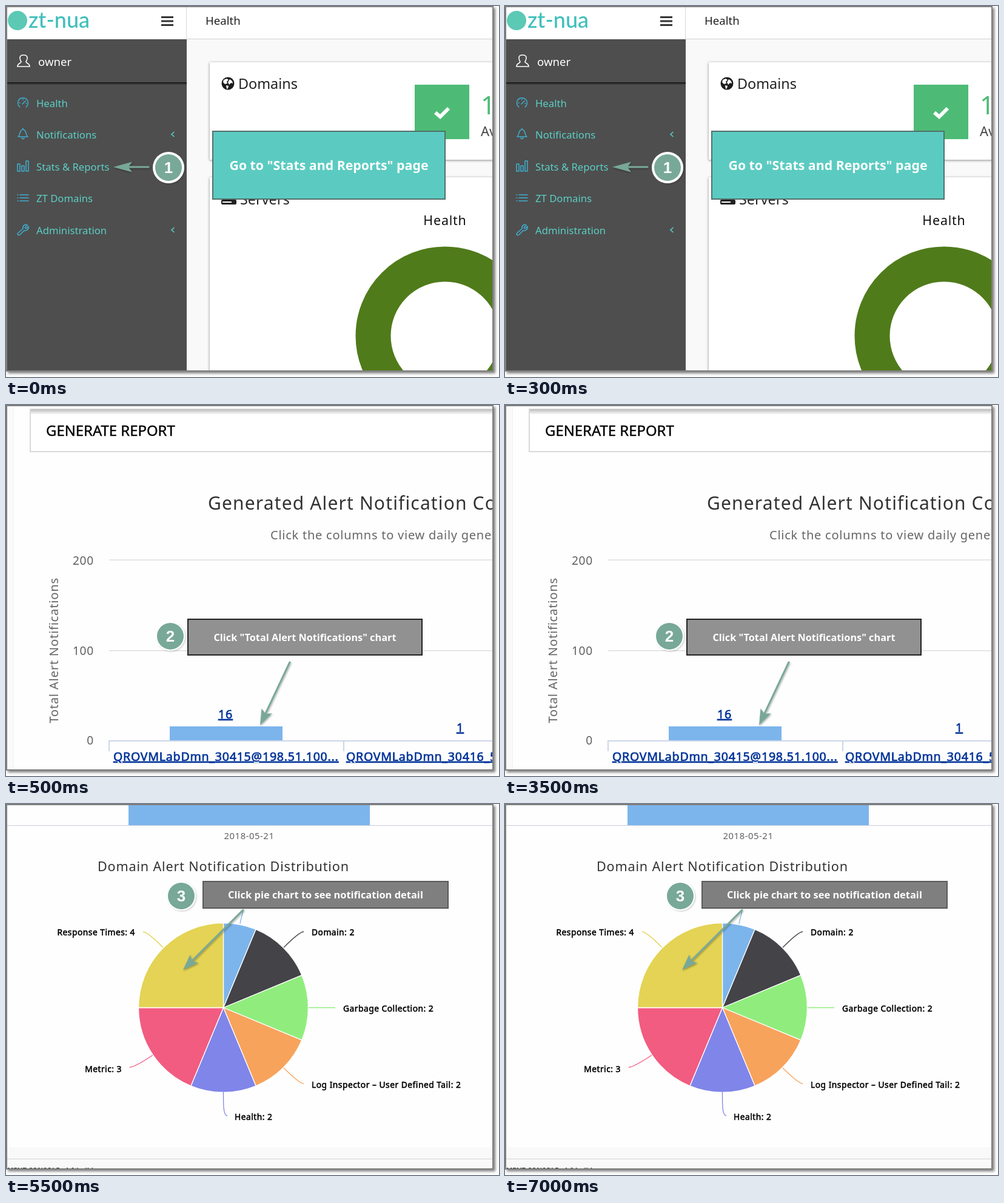
These frames come from a looping animation (813 px wide and 613 px high, 8 s). An HTML page:

```html
<!DOCTYPE html>
<html lang="en">
<head>
<meta charset="utf-8">
<title>Alert notification walkthrough</title>
<style>
  html, body { margin: 0; width: 100%; height: 100%; overflow: hidden; background: #fff; }
  svg { display: block; width: 813px; height: 613px; }
  text { font-family: "Noto Sans", "Open Sans", sans-serif; white-space: pre; }
  .chart { letter-spacing: .038em; }
  .menu { font-size: 16.7px; fill: #5bcfc5; }
  .note { font-weight: 700; fill: #fff; text-anchor: middle; }
  .badge { font: 700 26px "Liberation Sans", Arial, sans-serif; fill: #fff; text-anchor: middle; }
  .icon { fill: none; stroke: #3fb0cf; stroke-width: 1.5; stroke-linecap: round; stroke-linejoin: round; }
  .link { font-size: 19.6px; fill: #003399; stroke: #003399; stroke-width: .7px; text-decoration: underline; }
  .slice { font-size: 13.75px; stroke: #000; stroke-width: .55px; }
  .end { text-anchor: end; }
  .mid { text-anchor: middle; }
</style>
</head>
<body>
<svg viewBox="0 0 813 613">
  <defs>
    <clipPath id="page"><rect x="2" y="2" width="800" height="600"/></clipPath>
    <filter id="soft" x="-20%" y="-20%" width="140%" height="140%">
      <feDropShadow dx="1" dy="1.5" stdDeviation="1.5" flood-opacity=".35"/>
    </filter>
    <filter id="faint" x="-20%" y="-20%" width="140%" height="140%">
      <feDropShadow dx="1.5" dy="1.5" stdDeviation="1" flood-opacity=".18"/>
    </filter>
    <filter id="halo" x="-5%" y="-10%" width="110%" height="120%">
      <feDropShadow dx="0" dy="1" stdDeviation="2" flood-opacity=".45"/>
    </filter>
    <filter id="edge" x="-5%" y="-5%" width="110%" height="110%">
      <feDropShadow dx="3" dy="3" stdDeviation="2" flood-opacity=".5"/>
    </filter>
    <linearGradient id="fade" x2="0" y2="1">
      <stop stop-color="#bbb"/><stop offset="1" stop-color="#fff"/>
    </linearGradient>
  </defs>
  <rect width="804" height="604" fill="#7f7f7f" filter="url(#edge)"/>
  <g id="stage" clip-path="url(#page)"></g>
</svg>
<script>
const LOOP = 8000;
const SAGE = '#78a898';

const rect = (x, y, w, h, fill, extra = '') =>
  `<rect x="${x}" y="${y}" width="${w}" height="${h}" fill="${fill}" ${extra}/>`;

const text = (x, y, str, cls, style = '') =>
  `<text x="${x}" y="${y}" class="${cls}" style="${style}">${str}</text>`;

const icon = (x, y, d) => `<path class="icon" transform="translate(${x} ${y})" d="${d}"/>`;

const badge = (x, y, n, ring) => `
  <circle cx="${x}" cy="${y}" r="${ring}" fill="#fff" filter="url(#faint)"/>
  <circle cx="${x}" cy="${y}" r="22" fill="${SAGE}"/>
  ${text(x, y + 9, n, 'badge')}`;

const note = (x, y, w, h, fill, border, size, str) =>
  rect(x, y, w, h, fill, `stroke="${border}" stroke-width="2"`) +
  text(x + w / 2, y + h / 2 + size * .37, str, 'note', `font-size:${size}px`);

// Swept-back arrow head, drawn along the x axis and rotated into place
function arrow(x1, y1, x2, y2, head, half) {
  const length = Math.hypot(x2 - x1, y2 - y1);
  const angle = Math.atan2(y2 - y1, x2 - x1) * 180 / Math.PI;
  const neck = length - head * .8;
  return `<g filter="url(#soft)"><g transform="translate(${x1} ${y1}) rotate(${angle})">
    <path d="M0 0H${neck}" stroke="${SAGE}" stroke-width="3" stroke-linecap="round"/>
    <path d="M${length} 0L${length - head} ${-half}L${neck} 0L${length - head} ${half}Z" fill="${SAGE}"/>
  </g></g>`;
}

function pie(cx, cy, r, slices) {
  const total = slices.reduce((sum, [n]) => sum + n, 0);
  const point = n => {
    const a = n / total * 2 * Math.PI;
    return `${cx + r * Math.sin(a)} ${cy - r * Math.cos(a)}`;
  };
  let at = 0;
  return slices.map(([n, fill]) => {
    const from = point(at), to = point(at += n);
    return `<path d="M${cx} ${cy}L${from}A${r} ${r} 0 0 1 ${to}Z" fill="${fill}" stroke="#fff" stroke-width="1.3" stroke-linejoin="round"/>`;
  }).join('');
}

function dashboard() {
  const rows = [[160, 'Health'], [212, 'Notifications'], [265, 'Stats &amp; Reports'],
                [317, 'ZT Domains'], [370, 'Administration']];
  const chevron = y => `<path d="M277.5 ${y - 4}l-4.5 4 4.5 4" fill="none" stroke="#5bcfc5" stroke-width="1.6"/>`;
  const card = (y, h) => rect(336, y, 490, h, '#fff', 'filter="url(#halo)"');
  return rect(2, 2, 800, 600, '#f9f9f9') +
    rect(2, 2, 800, 52, '#fff') + rect(298, 54, 504, 1, '#d0d0d0') + rect(297, 2, 1, 52, '#d8d8d8') +
    '<circle cx="19" cy="24" r="16" fill="#5cc9b5"/>' +
    text(37, 36, 'zt-nua', '', 'font:500 36px Lato,sans-serif;fill:#3fbfbc') +
    [17, 23.5, 30].map(y => rect(256, y, 20, 3, '#333')).join('') +
    text(329, 31, 'Health', '', 'font-size:18.6px;fill:#222') +
    rect(2, 55, 296, 547, '#4e4e4e') +
    rect(2, 126, 296, 2, '#1c1c1c') + rect(2, 128, 296, 2, '#3d3d3d') +
    '<path d="M25 92C21 85 23 81 29 81S37 85 33 92C33 95 39 94 39 100H19C19 94 25 95 25 92Z" fill="none" stroke="#fff" stroke-width="1.6"/>' +
    text(53, 99, 'owner', '', 'font-size:18.6px;fill:#fff') +
    icon(28, 160, 'M-5 7A8.5 8.5 0 1 1 5 7M-1 2L4-3M-6 0h1M0-6v1M6 1h-1') +
    icon(28, 211, 'M-8 5C-4 2-6-7 0-7S4 2 8 5ZM-2 7Q0 10 2 7M0-9v2') +
    icon(28, 265, 'M-9 8V-4h4V8ZM-2 8V-1h4V8ZM5 8V-9h4V8Z') +
    icon(28, 317, 'M-9-5h1M-9 0h1M-9 5h1M-5-5H9M-5 0H9M-5 5H9') +
    icon(28, 370, 'M-8 5L0-2C-1-7 3-10 7-8L3-4 5-2 9-6C10-1 6 2 2 1L-5 8C-8 10-10 7-8 5Z') +
    rows.map(([y, label]) => text(50, y + 6.5, label, 'menu')).join('') +
    chevron(212) + chevron(370) +
    card(93, 161) + card(283, 340) +
    '<circle cx="366" cy="128" r="10.5" fill="#1c1c1c"/>' +
    '<path d="M359 122l5-2 3 2-3 3 1 3-4 1-3-3ZM369 121l4 3 1 4-3-1-3 3-2-4ZM363 131l4 1-1 4-2 1Z" fill="#fff"/>' +
    text(383, 137, 'Domains', '', 'font-size:23.4px;fill:#222') +
    rect(674, 130, 90, 90, '#4dbb76') +
    '<path d="M708 176l8 7 14-14" fill="none" stroke="#fff" stroke-width="6"/>' +
    text(783, 179, '1', '', 'font-size:42px;fill:#4dbb76') +
    text(783, 215, 'Available', '', 'font-size:22px;fill:#444') +
    rect(355, 311, 25, 7, '#222', 'rx="2"') + rect(355, 320, 25, 8, '#222', 'rx="2"') +
    rect(357, 323, 15, 2, '#fff') +
    text(386, 328, 'Servers', '', 'font-size:23.4px;fill:#222') +
    text(724, 362, 'Health', 'chart mid', 'font-size:21.4px;fill:#111') +
    '<circle cx="724" cy="545" r="118.5" fill="none" stroke="#507b1a" stroke-width="58"/>' +
    note(341, 207, 383, 112, '#5bcbc1', '#536f6c', 21.3, 'Go to "Stats and Reports" page') +
    arrow(235, 266, 177, 266, 31, 8.5) + badge(268, 267, 1, 26);
}

function columnChart() {
  const axisLabel = (y, n) => text(145, y, n, 'chart end', 'font-size:19.2px;fill:#606060');
  return rect(2, 2, 800, 600, '#fefefe') + rect(2, 2, 10, 600, '#fafafa') + rect(12, 2, 1, 600, '#f0f0f0') +
    rect(39, 6, 780, 72, '#d9d9d9') + rect(41, 8, 780, 68, '#fff') + rect(41, 7, 780, 9, 'url(#fade)') +
    text(66, 51, 'GENERATE REPORT', '', 'font-size:23.9px;stroke:#000;stroke-width:.4px') +
    text(333, 173, 'Generated Alert Notification Counts', 'chart', 'font-size:30px;fill:#333') +
    text(436, 222, 'Click the columns to view daily generated alerts', 'chart', 'font-size:20px;fill:#666') +
    rect(170, 255, 640, 2, '#e6e6e6') + rect(170, 405, 640, 2, '#e6e6e6') +
    axisLabel(264, 200) + axisLabel(413, 100) + axisLabel(561, 0) +
    '<text class="chart mid" transform="translate(86 405.5) rotate(-90)" font-size="20.2" fill="#666">Total Alert Notifications</text>' +
    rect(270, 531, 186, 23, '#7cb5ec') +
    rect(169, 554, 640, 2, '#ccd6eb') + rect(169, 554, 2, 18, '#ccd6eb') + rect(556, 554, 2, 18, '#ccd6eb') +
    text(362, 518, '16', 'chart link mid') + text(749, 540, '1', 'chart link mid') +
    text(177, 588, 'QROVMLabDmn_30415@198.51.100...', 'chart link') +
    text(561, 588, 'QROVMLabDmn_30416_5', 'chart link') +
    note(300, 354, 386, 59, '#919191', '#222', 16.3, 'Click "Total Alert Notifications" chart') +
    badge(271, 382, 2, 24) + arrow(468, 425, 419, 529, 26, 9.5);
}

function pieChart() {
  const slices = [[1, '#7cb5ec'], [2, '#434348'], [2, '#90ed7d'], [2, '#f7a35c'],
                  [2, '#8085e9'], [3, '#f15c80'], [4, '#e4d354']];
  const leaders = ['M391 175C390 184 387 190 386 198', 'M491 211C485 211 470 225 458 237',
    'M543 336.5H499', 'M491 462C485 462 470 448 458 436', 'M365 515C358 515 358.5 495 358.5 476',
    'M204 435C211 435 227 425 242 415', 'M226 211C232 211 247 225 259 237'];
  const labels = [[213, 217, 'Response Times: 4', 'end'], [504, 217, 'Domain: 2'],
    [556, 343, 'Garbage Collection: 2'], [504, 469, 'Log Inspector – User Defined Tail: 2'],
    [377, 522, 'Health: 2'], [191, 443, 'Metric: 3', 'end']];
  return rect(2, 2, 800, 600, '#fefefe') +
    rect(202, 2, 398, 33, '#7cb5ec') + rect(2, 35, 800, 1, '#c9cfdc') +
    text(401, 58, '2018-05-21', 'chart mid', 'font-size:14.8px;fill:#606060') +
    text(151, 111, 'Domain Alert Notification Distribution', 'chart', 'font-size:21.6px;fill:#333') +
    pie(358.5, 336.5, 140, slices) +
    leaders.map((d, i) => `<path d="${d}" fill="none" stroke="${slices[i][1]}" stroke-width="1.3"/>`).join('') +
    labels.map(([x, y, str, side = '']) => text(x, y, str, `chart slice ${side}`)).join('') +
    rect(2, 567, 800, 35, '#f9f9f9') + rect(2, 586, 800, 1, '#d5d5d5') +
    text(2, 609, 'MENT CONSOLE v1.0 build', '', 'font-size:11px;font-weight:700;fill:#222') +
    note(325, 128, 404, 44, '#7f7f7f', '#595959', 16.45, 'Click pie chart to see notification detail') +
    badge(289, 152, 3, 24) + arrow(391, 175, 292, 274, 26, 9.5);
}

const scenes = [[0, dashboard], [500, columnChart], [5500, pieChart]];
const stage = document.getElementById('stage');
stage.innerHTML = scenes.map(([, draw]) => `<g>${draw()}</g>`).join('');

[...stage.children].forEach((scene, i) => {
  const steps = scenes.map(([start], j) =>
    ({ offset: start / LOOP, opacity: i === j ? 1 : 0, easing: 'step-end' }));
  steps.push({ offset: 1, opacity: steps.at(-1).opacity });
  scene.animate(steps, { duration: LOOP, iterations: Infinity });
});
</script>
</body>
</html>
```
